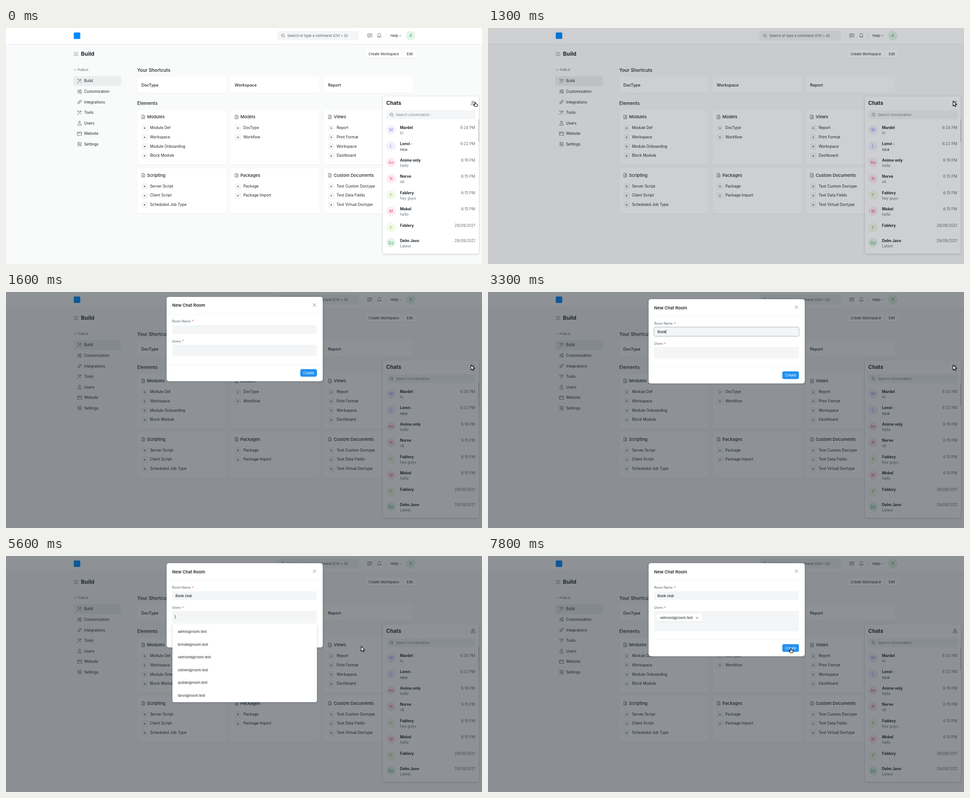
An HTML page that plays this animation: 1061x528 px, repeating every 8 s.

```html
<!DOCTYPE html>
<html lang="en">
<head>
<meta charset="utf-8">
<title>New chat room</title>
<style>
  html, body { margin: 0; width: 100%; height: 100%; overflow: hidden; background: #f9fafa; }
  svg { display: block; width: 100vw; height: 100vh; font-family: Inter, "Open Sans", sans-serif; }
  text { white-space: pre; }
</style>
</head>
<body>
<svg id="stage" viewBox="0 0 1061 528" xmlns="http://www.w3.org/2000/svg"></svg>
<script>
const INK = '#1f272e', SOFT = '#687178', FIELD = '#f4f5f6';
const LOOP = 8000, STEP = 100;

const text = (x, y, s, size = 8.4, { w = 400, c = INK, a = 'start', id = '' } = {}) =>
  `<text${id && ` id="${id}"`} x="${x}" y="${y}" font-size="${size}" font-weight="${w}" fill="${c}" text-anchor="${a}">${s}</text>`;
const rect = (x, y, w, h, fill, r = 4, extra = '') =>
  `<rect x="${x}" y="${y}" width="${w}" height="${h}" rx="${r}" fill="${fill}" ${extra}/>`;
const line = (d, c = '#505a62', w = 0.8, extra = '') =>
  `<path d="${d}" fill="none" stroke="${c}" stroke-width="${w}" stroke-linecap="round" stroke-linejoin="round" ${extra}/>`;
const at = (x, y, body) => `<g transform="translate(${x} ${y})">${body}</g>`;
const card = (x, y, w, h, r = 5) => rect(x, y, w, h, '#fff', r, 'filter="url(#cardShadow)"');
const disc = (x, y, label, bg, fg) =>
  `<circle cx="${x}" cy="${y}" r="10.5" fill="${bg}"/>` + text(x, y + 3.2, label, 9, { c: fg, a: 'middle' });

// Icons are drawn around their own centre.
const icons = {
  tools: line('M-4 4L3 -3M-4.5 -3.5L-2.5 -4.5L0 -1.5M1 1L4 4M-4.5 -3.5L-1.5 -.5M2 -4.5L1.7 -1.8L4.5 -2.2M-4.6 2.8L-2.8 4.6'),
  sliders: line('M-4.5 -3H0M3 -3H4.5M-4.5 0H-3M0 0H4.5M-4.5 3H1M4 3H4.5') +
    [[1.5, -3], [-1.5, 0], [2.5, 3]].map(([x, y]) => `<circle cx="${x}" cy="${y}" r="1.2" fill="none" stroke="#505a62" stroke-width=".8"/>`).join(''),
  plug: line('M-4.5 4.5L-2.7 2.7M2.7 -2.7L4.5 -4.5M-2.8 -.6L.6 2.8C-.5 4-2 4-3 3S-4 .5-2.8 -.6ZM-.6 -2.8L2.8 .6C4 -.5 4 -2 3 -3S.5 -4-.6 -2.8ZM-1.5 .6L-.6 -.3M-.4 1.6L.4 .8'),
  user: line('M-4 4.5V3.5C-4 1.8-2.6 1-1 1H1C2.6 1 4 1.8 4 3.5V4.5ZM-2 -2.6A2 2 0 1 0 2 -2.6A2 2 0 1 0 -2 -2.6Z'),
  window: line('M-4.5 -3.5H4.5V4H-4.5ZM-4.5 -1H4.5M-3 -2.3H-2.8M-1.5 -2.3H-1.3'),
  toggles: line('M-2.5 -4H2.5A1.7 1.7 0 0 1 2.5 -.6H-2.5A1.7 1.7 0 0 1 -2.5 -4ZM-2.5 .8H2.5A1.7 1.7 0 0 1 2.5 4.2H-2.5A1.7 1.7 0 0 1 -2.5 .8ZM-2.5 -2.3H-2.4M2.4 2.5H2.5'),
  file: line('M-3 -4.2H.8L3.2 -1.8V4.2H-3ZM.8 -4.2V-1.8H3.2M-1.3 .2H1.4M-1.3 2.1H1.4'),
  search: line('M-3.6 -.6A3 3 0 1 0 2.4 -.6A3 3 0 1 0 -3.6 -.6ZM1.6 1.6L4 4'),
  bubble: line('M-4.5 -3.8H4.5V2.8H-.5L-2.8 4.8V2.8H-4.5ZM-2.3 -1.5H2.3M-2.3 .5H1'),
  bell: line('M-4 2.8C-2.8 1.8-3 .5-3 -1.2A3 3 0 0 1 3 -1.2C3 .5 2.8 1.8 4 2.8ZM-1.2 4.4Q0 5.3 1.2 4.4'),
  people: line('M-4.5 4V3C-4.5 1.5-3.5 .8-2 .8H0C1.3 .8 2.2 1.5 2.2 3V4ZM-2.8 -2.3A1.8 1.8 0 1 0 .8 -2.3A1.8 1.8 0 1 0 -2.8 -2.3ZM2 -4A1.8 1.8 0 0 1 2 -.7M3 1C4.2 1.2 4.7 2 4.7 3V4H4')
};
const icon = (name, x, y) => at(x, y, icons[name]);

function navbar() {
  return rect(0, 0, 1061, 36, '#fff', 0, 'filter="url(#cardShadow)"') +
    rect(151, 10, 14.5, 14.5, '#0089ff', 2) +
    rect(605, 6.5, 182, 21, FIELD) + icon('search', 617.5, 17) +
    text(627, 19.8, 'Search or type a command (Ctrl + G)', 7.76, { c: '#505a62' }) +
    icon('bubble', 811, 17) + icon('bell', 832, 16.5) + line('M847.5 12V22', '#d1d8dd', 0.7) +
    text(857, 19.8, 'Help', 7.76) + line('M876.5 16L878.7 18.2L880.9 16') +
    disc(902, 17, 'A', '#e4f5e9', '#38a160');
}

function sidebar() {
  const items = [['Build', 'tools'], ['Customization', 'sliders'], ['Integrations', 'plug'], ['Tools', 'tools'],
    ['Users', 'user'], ['Website', 'window'], ['Settings', 'toggles']];
  return line('M151.5 54.7H160.5M151.5 58.2H160.5M151.5 61.7H160.5', SOFT) +
    text(167, 61.8, 'Build', 12.2, { w: 700 }) +
    line('M151.8 92.7L154 94.9L156.2 92.7') + text(160, 96, 'PUBLIC', 6.7, { c: '#505a62' }) +
    rect(150, 107.7, 106.5, 22, '#ebedee') +
    items.map(([label, name], i) => {
      const y = 118.5 + i * 23.55;
      return icon(name, 164, y) + text(174, y + 2.9, label);
    }).join('');
}

function workspace() {
  const columns = [292.5, 500.5, 708.5];
  const shortcuts = ['DocType', 'Workspace', 'Report'];
  const groups = [
    ['Modules', 'Module Def', 'Workspace', 'Module Onboarding', 'Block Module'],
    ['Models', 'DocType', 'Workflow'],
    ['Views', 'Report', 'Print Format', 'Workspace', 'Dashboard'],
    ['Scripting', 'Server Script', 'Client Script', 'Scheduled Job Type'],
    ['Packages', 'Package', 'Package Import'],
    ['Custom Documents', 'Test Custom Doctype', 'Test Data Fields', 'Test Virtual Doctype']
  ];
  const group = ([title, ...links], i) => {
    const x = columns[i % 3], top = i < 3 ? 183.5 : 314;
    return card(x, top, 199, i < 3 ? 122 : 101.5) + icon('file', x + 13.5, top + 15.5) +
      text(x + 22, top + 18.8, title, 9.5, { w: 500 }) +
      links.map((label, k) => {
        const y = top + 39.7 + k * 20.7;
        return rect(x + 9.5, y - 6.5, 14, 14, FIELD, 3) +
          `<circle cx="${x + 16.5}" cy="${y + 0.7}" r="1.2" fill="${INK}"/>` + text(x + 28.5, y + 2.9, label);
      }).join('');
  };
  return card(801.5, 49, 81, 18, 4) + text(842, 60.9, 'Create Workspace', 7.76, { a: 'middle' }) +
    card(886.5, 49, 27.5, 18, 4) + text(900.2, 60.9, 'Edit', 7.76, { a: 'middle' }) +
    text(292.5, 97.9, 'Your Shortcuts', 10.4, { w: 500 }) + text(292.5, 172.3, 'Elements', 10.4, { w: 500 }) +
    shortcuts.map((s, i) => card(columns[i], 109, 199, 36.5) + text(columns[i] + 9.3, 130.6, s, 9.06, { w: 500 })).join('') +
    groups.map(group).join('');
}

function chats() {
  const violet = ['#f1f0fd', '#8b84de'], pink = ['#fdebf1', '#e6487c'], lime = ['#f3f9e9', '#8ab656'], green = ['#e4f5e9', '#2f9d58'];
  const rows = [
    ['Mardel', 'M', 'hi', '6:24 PM', violet], ['Lonvi', 'L', 'nice', '6:22 PM', violet],
    ['Anime only', 'Ao', 'hello', '6:19 PM', pink], ['Norve', 'N', 'ok', '6:15 PM', pink],
    ['Fablery', 'F', 'hey guys', '6:15 PM', lime], ['Mokel', 'M', 'hello', '6:15 PM', pink],
    ['Fablery', 'F', '', '28/09/2021', lime], ['Delm Javo', 'DJ', 'Latest', '28/09/2021', green]
  ];
  return rect(840, 153, 214, 352, '#fff', 5, 'filter="url(#panelShadow)"') +
    text(847.5, 171.7, 'Chats', 11.7, { w: 700 }) + icon('people', 1041, 167.5) +
    rect(848, 184, 198.5, 20, FIELD) + icon('search', 859.5, 194) +
    text(869, 196.8, 'Search conversation', 7.76, { c: '#7c858c' }) +
    rect(1053, 204, 1.6, 51, '#c1c4c6', 0.8) +
    rows.map(([name, initials, msg, time, [bg, fg]], i) => {
      const y = i < 7 ? 223 + i * 36.42 : 475.5, unread = i === 1;
      return disc(858.3, y + 4.8, initials, bg, fg) + text(878.3, y + 3, name, 8.4, { w: 700 }) +
        (unread ? `<circle cx="904.3" cy="${y + 0.4}" r="1" fill="#2490ef"/>` : '') +
        text(878.3, y + 15.2, msg, 8.4, { c: unread ? INK : SOFT }) +
        text(1045.8, y + 3, time, 8.4, { c: SOFT, a: 'end' });
    }).join('');
}

const CHOSEN = 'velmond@room.test';
const PEOPLE = ['admin@room.test', 'brindel@room.test', CHOSEN, 'ostrem@room.test', 'quillan@room.test', 'tarvo@room.test', 'wendrik@room.test'];
const ROW = 28.5;

function dialog() {
  const label = (y, s, starX) => text(370.5, y, s, 7.1, { c: '#505a62' }) + text(starX, y + 0.6, '*', 7.6, { c: '#e24c4c' });
  return `<g id="dialog">
    <rect id="sheet" x="358" y="16" width="348" rx="5" fill="#fff" filter="url(#panelShadow)"/>
    ${text(370.5, 38.6, 'New Chat Room', 9.5, { w: 600 })}
    ${line('M684.5 31L690.7 37.2M690.7 31L684.5 37.2', SOFT, 0.9)}
    ${line('M358 54.5H706', '#f0f2f4', 0.7)}
    ${label(73, 'Room Name', 414.5)}
    ${rect(370.5, 79, 322.5, 19.5, FIELD)}
    ${rect(370, 78.5, 323.5, 20.5, 'none', 4, 'id="ring" stroke="#c0c6cb" stroke-width="1.3"')}
    ${text(377.8, 91.5, '', 7.76, { id: 'room', w: 500 })}
    ${label(118, 'Users', 392.5)}
    <rect id="users" x="370.5" y="123" width="322.5" rx="4" fill="${FIELD}"/>
    <g id="chip">
      ${rect(376.5, 129.5, 101, 17, '#fff', 3, 'filter="url(#cardShadow)"')}
      ${text(383, 140.9, CHOSEN, 7.76)}
      ${line('M464 136.3L468.4 140.7M468.4 136.3L464 140.7', '#505a62', 0.8)}
    </g>
    <g id="footer">
      ${line('M358 167.5H706', '#ebeef0', 0.7)}
      ${rect(656, 177.5, 37, 17.2, '#2490ef')}
      ${text(674.5, 188.9, 'Create', 7.76, { c: '#fff', a: 'middle' })}
    </g>
    <rect id="caret" width=".8" fill="${INK}"/>
    <g id="list">
      ${rect(371, 152, 322, 175, '#fff', 4, 'filter="url(#panelShadow)"')}
      ${rect(376, 155 + 2 * ROW, 312, ROW, FIELD, 4, 'id="hover"')}
      <g id="options"></g>
    </g>
  </g>`;
}

const pointer = `
  <path id="arrow" d="M0 0V11L2.6 8.7L4.5 12.6L6.3 11.8L4.5 8H8Z" fill="#fff" stroke="#000" stroke-width="1.1" stroke-linejoin="round"/>
  <path id="hand" d="M-1.2 .8Q0 -.6 1.1 .8V3.6L4 4.2Q5.4 4.6 5.2 6L4.5 9.5H-1.4L-4 6Q-4 4.6-2.5 5.2L-1.2 6.2Z" fill="#fff" stroke="#000" stroke-width="1.1" stroke-linejoin="round"/>`;

const stage = document.getElementById('stage');
stage.innerHTML = `<defs>
    <filter id="cardShadow" x="-20%" y="-30%" width="140%" height="160%"><feDropShadow dx="0" dy=".4" stdDeviation=".7" flood-color="#192734" flood-opacity=".17"/></filter>
    <filter id="panelShadow" x="-10%" y="-10%" width="120%" height="120%"><feDropShadow dx="0" dy="1" stdDeviation="2" flood-color="#192734" flood-opacity=".22"/></filter>
  </defs>` + rect(0, 0, 1061, 528, '#f9fafa', 0) + navbar() + sidebar() + workspace() + chats() +
  rect(0, 0, 1061, 528, INK, 0, 'id="shade"') + dialog() + `<g id="pointer">${pointer}</g>`;

const el = Object.fromEntries([...stage.querySelectorAll('[id]')].map(n => [n.id, n]));
const set = (node, attrs) => Object.entries(attrs).forEach(([k, v]) => node.setAttribute(k, v));
const show = (node, on) => node.setAttribute('visibility', on ? 'inherit' : 'hidden');
const clamp = v => Math.min(1, Math.max(0, v));
const within = (t, a, b) => t >= a && t < b;

const PATH = [[100, 1046, 166], [300, 990, 158], [600, 838, 135], [800, 945, 150], [1000, 1036.5, 163.5],
  [5300, 1036.5, 163.5], [5700, 710, 215], [6000, 485.5, 238], [6200, 485.5, 238], [6500, 485.5, 109.5],
  [7200, 485.5, 109.5], [7600, 715, 214], [7800, 675, 207]];
const KEYS = [2400, 2900, 3000, 3300, 3400, 3600, 3700, 4000, 4200];

function pathAt(t) {
  const i = PATH.findIndex(p => p[0] >= t);
  if (i < 0) return PATH.at(-1).slice(1);
  if (i === 0) return PATH[0].slice(1);
  const [t0, x0, y0] = PATH[i - 1], [t1, x1, y1] = PATH[i];
  const p = (t - t0) / (t1 - t0);
  return [x0 + (x1 - x0) * p, y0 + (y1 - y0) * p];
}

function drawCaret(t, chosen) {
  const inRoom = within(t, 1800, 4500), inUsers = within(t, 4500, 7000);
  const started = inRoom ? Math.max(1800, ...KEYS.filter(k => k <= t)) : chosen ? 6200 : 4500;
  const on = (t - started) % 1060 < 500;
  show(el.caret, (inRoom || inUsers) && on);
  if (inRoom) {
    const typed = el.room.textContent;
    set(el.caret, { x: 377.6 + (typed ? el.room.getComputedTextLength() : 0), y: 84, height: 9 });
  } else {
    set(el.caret, { x: 376.6, y: chosen ? 151.8 : 131.8, height: 8.4 });
  }
}

function draw(t) {
  set(el.shade, { opacity: 0.5 * clamp((t - 1234) / 150) });

  const slide = 37 * (1 - clamp((t - 1400) / 300)) ** 1.8;
  show(el.dialog, t > 1400);
  set(el.dialog, { transform: `translate(0 ${-slide})`, opacity: clamp((t - 1400) / 150) });

  const chosen = t >= 6200, grow = chosen ? 19.8 : 0;
  set(el.sheet, { height: 188.5 + grow });
  set(el.users, { height: 25.5 + grow });
  set(el.footer, { transform: `translate(0 ${grow})` });
  show(el.chip, chosen);
  show(el.ring, within(t, 1800, 4500));
  el.room.textContent = 'Book club'.slice(0, KEYS.filter(k => k <= t).length);
  drawCaret(t, chosen);

  const open = within(t, 5100, 6200) || within(t, 6800, 7000);
  show(el.list, open);
  set(el.list, { transform: `translate(0 ${grow})` });
  show(el.hover, open && within(t, 5900, 6200));
  el.options.innerHTML = PEOPLE.filter(p => !chosen || p !== CHOSEN).slice(0, 6)
    .map((p, i) => text(383, 155 + ROW * (i + 0.5) + 2.8, p, 7.76)).join('');

  const hand = t < 200 || within(t, 1000, 1100) || within(t, 5900, 6200) || t >= 7700;
  set(el.pointer, { transform: `translate(${pathAt(t).join(' ')})` });
  show(el.arrow, !hand);
  show(el.hand, hand);
}

const start = performance.now();
function tick() {
  draw(Math.floor((performance.now() - start) % LOOP / STEP) * STEP);
  requestAnimationFrame(tick);
}
tick();
</script>
</body>
</html>
```
